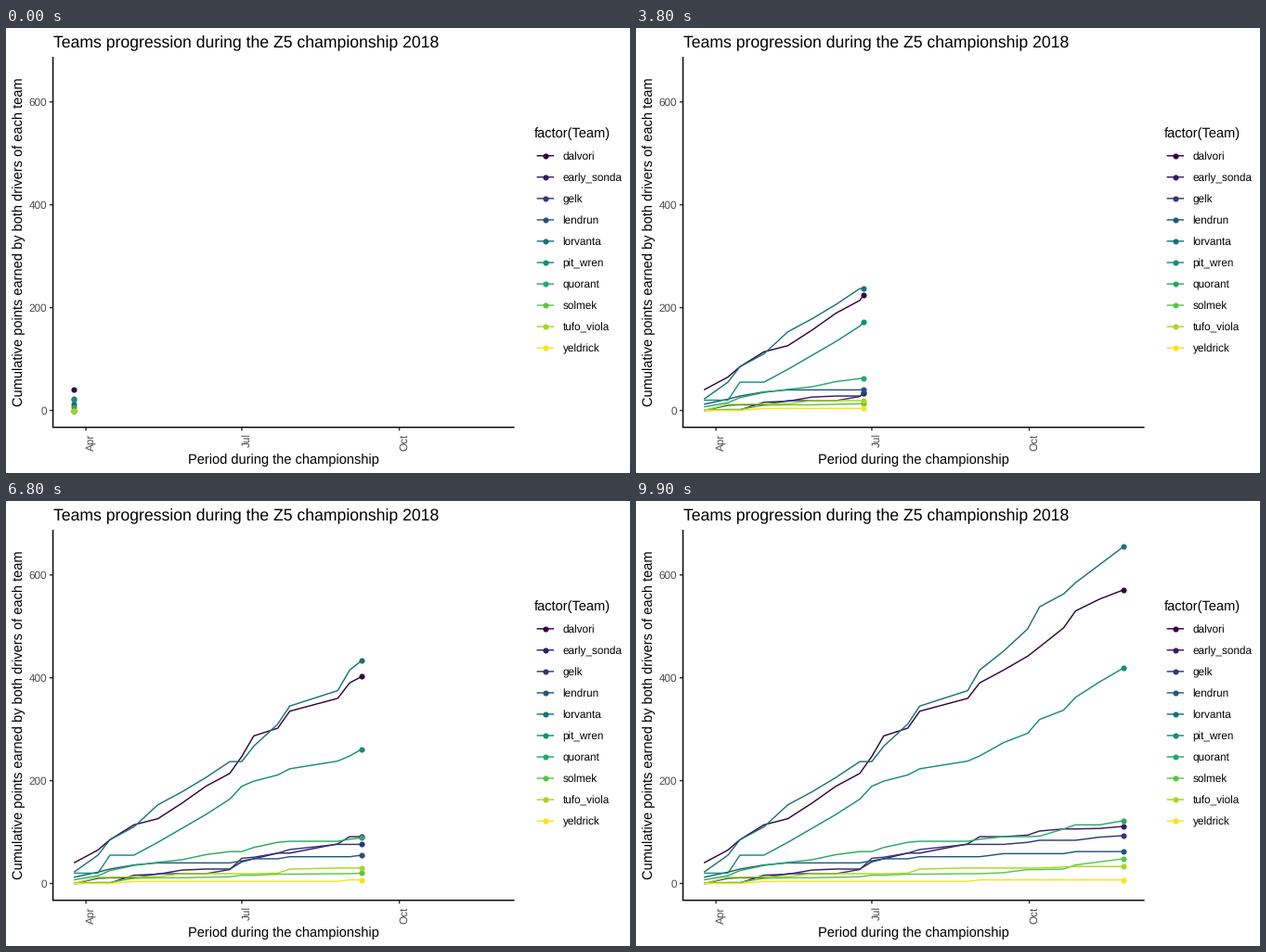
Recreate the animation shown at these times as a matplotlib script. Size 672 px wide and 480 px high, loop 10000 ms.

```python
import numpy as np
import matplotlib.pyplot as plt
from matplotlib.animation import FuncAnimation

W, H, DPI = 672, 480, 96
FRAMES, INTERVAL = 100, 100
LEFT, RIGHT, TOP, BOTTOM = 50.6, 547.6, 31.1, 430.7
DAYS, MAX_POINTS = 245, 655
GREY, TICK = "#4d4d4d", "#333333"
LINE = 1.07

plt.rcParams.update({
    "font.family": "Liberation Sans",
    "path.snap": False,
    "text.hinting": "none",
    "lines.solid_capstyle": "butt",
    "lines.solid_joinstyle": "round",
    "lines.linewidth": LINE,
    "lines.markersize": 4.6,
    "lines.markeredgewidth": 0,
})

fig = plt.figure(figsize=(W / DPI, H / DPI), dpi=DPI, facecolor="white")
ax = fig.add_axes([0, 0, 1, 1])
ax.set(xlim=(0, W), ylim=(H, 0))
ax.axis("off")


def day_x(day):
    return LEFT + (RIGHT - LEFT) * (day / DAYS + 0.05) / 1.1


def points_y(points):
    return BOTTOM - (BOTTOM - TOP) * (points / MAX_POINTS + 0.05) / 1.1


def label(x, y, text, size=8.8, color="black", ha="left", angle=0):
    ax.text(x, y, text, size=size, color=color, ha=ha, va="baseline",
            rotation=angle, rotation_mode="anchor")


# Race days, from the weeks between races
weeks = np.cumsum([0, 2, 1, 2, 2, 2, 2, 2, 1, 1, 2, 1, 4, 1, 2, 2, 1, 2, 1, 2, 2])
race_x = day_x(weeks * 7)
# Each race falls on its nearest whole frame; the heads move evenly in between
race_frame = np.rint(weeks * 7 / DAYS * (FRAMES - 1)).astype(int)

teams = []


def add_team(name, *gains):
    """Register a team by the points it gained in each race."""
    padded = np.zeros(len(weeks))
    padded[:len(gains)] = gains
    teams.append((name, points_y(np.cumsum(padded))))


add_team("dalvori", 40, 25, 20, 29, 12, 30, 33, 25, 33, 40, 15, 33, 25, 30,
         25, 27, 18, 37, 33, 23, 18)
add_team("early_sonda", 0, 1, 0, 15, 2, 8, 2, 0, 14, 6, 11, 0, 18, 14,
         0, 3, 8, 4, 0, 1, 4)
add_team("gelk", 0, 10, 1, 0, 8, 0, 0, 8, 22, 2, 8, 7, 10, 0,
         0, 4, 4, 0, 0, 6, 3)
add_team("lendrun", 12, 10, 6, 8, 4, *[0] * 3, 4, 4, 0, 4, 0, 0, 6, *[0] * 3, 4)
add_team("lorvanta", 22, 33, 30, 25, 43, 25, 28, 31, 0, 30, 43, 35, 30, 40,
         37, 43, 43, 25, 22, 35, 35)
add_team("pit_wren", 20, 0, 35, 0, 25, 27, 27, 30, 25, 10, 12, 12, 15, 10,
         26, 18, 27, 18, 25, 30, 27)
add_team("quorant", 7, 8, 10, 10, 6, 5, 10, 6, 0, 8, 10, 2, 0, 4,
         5, 0, 1, 14, 8, 0, 8)
add_team("solmek", 0, 2, 0, 8, 1, 0, 1, 1, 3, 0, 2, 0, 1, 0,
         2, 6, 0, 1, 8, 6, 6)
add_team("tufo_viola", 0, 12, 0, 1, 0, 6, *[0] * 4, 1, 8, 2, *[0] * 4, 2, 1)
add_team("yeldrick", *[0] * 3, 4, *[0] * 9, 3)

# Viridis, slightly darkened
colors = plt.get_cmap("viridis")(np.linspace(0, 1, len(teams)))[:, :3] ** 1.22

# Axes
ax.plot([LEFT, LEFT, RIGHT], [TOP, BOTTOM, BOTTOM], color="black",
        solid_joinstyle="miter", zorder=4)
for value in (0, 200, 400, 600):
    y = points_y(value)
    ax.plot([LEFT - 3.67, LEFT], [y, y], color=TICK)
    label(LEFT - 6.6, y + 4.2, str(value), color=GREY, ha="right")
for day, month in ((7, "Apr"), (98, "Jul"), (190, "Oct")):
    x = day_x(day)
    ax.plot([x, x], [BOTTOM, BOTTOM + 3.67], color=TICK)
    label(x + 8.4, BOTTOM + 6.6, month, color=GREY, ha="right", angle=90)

label(LEFT, 20, "Teams progression during the Z5 championship 2018", 13.2)
label((LEFT + RIGHT) / 2, 469.7, "Period during the championship", 11, ha="center")
label(17.8, (TOP + BOTTOM) / 2,
      "Cumulative points earned by both drivers of each team", 11,
      ha="center", angle=90)

# Legend
label(569.2, 118.3, "factor(Team)", 11)
lines, heads = [], []
for i, ((name, _), color) in enumerate(zip(teams, colors)):
    y = 137.8 + 23.04 * i
    ax.plot([571.6, 590], [y, y], color=color)
    ax.plot([580.8], [y], "o", color=color)
    label(599.6, y + 4.2, name)
    lines += ax.plot([], [], color=color, zorder=2)
    heads += ax.plot([], [], "o", color=color, zorder=3)


def update(n):
    done = race_frame <= n
    x = np.interp(n, race_frame, race_x)
    for (_, ys), line, head in zip(teams, lines, heads):
        y = np.interp(n, race_frame, ys)
        line.set_data(np.append(race_x[done], x), np.append(ys[done], y))
        head.set_data([x], [y])
    # At the start the last two teams overlap in reverse order
    heads[-1].set_zorder(3 if n else 2.5)
    return lines + heads


anim = FuncAnimation(fig, update, frames=FRAMES, interval=INTERVAL,
                     repeat=True, repeat_delay=0)
plt.show()
```
